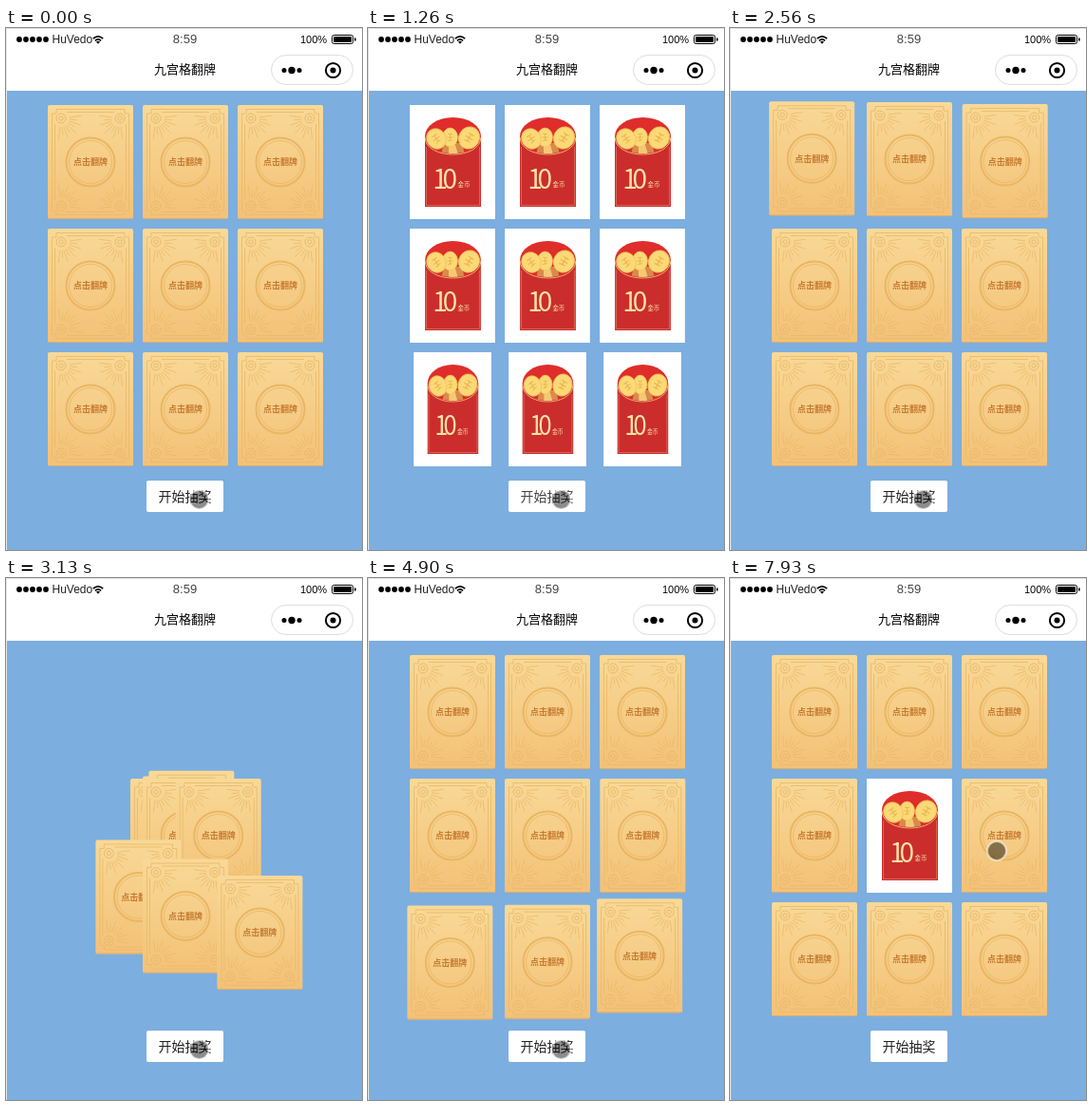
An HTML page for the animation above (8 s loop, 375 by 549 pixels).

```html
<!DOCTYPE html>
<html lang="zh-CN">
<head>
<meta charset="utf-8">
<title>九宫格翻牌</title>
<style>
  html, body { margin: 0; width: 100%; height: 100%; overflow: hidden; background: #fff; }
  svg { display: block; width: 375px; height: 549px; }
  text { font-family: "Noto Sans CJK SC", "Noto Sans CJK", sans-serif; }
  .latin { font-family: "Liberation Sans", sans-serif; }
  .mid { text-anchor: middle; }
</style>
</head>
<body>
<svg viewBox="0 0 375 549" width="375" height="549">
  <defs>
    <linearGradient id="gold" x1="0" y1="0" x2="0" y2="1">
      <stop offset="0" stop-color="#f8d997"/>
      <stop offset="1" stop-color="#f3c177"/>
    </linearGradient>

    <g id="corner" fill="none" stroke="#eaba6a">
      <circle cx="14" cy="14" r="5"/>
      <circle cx="14" cy="14" r="2.2"/>
      <path d="M45 4.5H9V9H4.5V60M45 7.5H20M7.5 60V20" stroke-width=".9"/>
      <g id="rays" stroke-width=".8"></g>
    </g>

    <g id="back">
      <rect width="90" height="120" rx="2" fill="url(#gold)"/>
      <path d="M1 119.5H89" stroke="#dfac66"/>
      <use href="#corner"/>
      <use href="#corner" transform="translate(90 0) scale(-1 1)"/>
      <use href="#corner" transform="translate(0 120) scale(1 -1)"/>
      <use href="#corner" transform="translate(90 120) scale(-1 -1)"/>
      <g fill="none" stroke="#eab663">
        <circle cx="45" cy="60" r="25.5" stroke-width="2"/>
        <circle cx="45" cy="60" r="22.5" stroke-width=".8"/>
      </g>
      <text class="mid" x="45" y="63.4" font-size="9" font-weight="700" fill="#c67a30">点击翻牌</text>
    </g>

    <g id="coin">
      <ellipse rx="10" ry="11" fill="#fbd977" stroke="#f3c257" stroke-width=".8"/>
      <path d="M-3 -4L3 -4M0 -4V4M-4 0H4M-3 4L3 3" stroke="#e8b24a" fill="none"/>
    </g>

    <g id="front">
      <rect width="90" height="120" fill="#fff"/>
      <ellipse cx="45.5" cy="33" rx="29.5" ry="20" fill="#df2d2b"/>
      <path d="M36 40H55L58 52H33Z" fill="#d98a4c"/>
      <path d="M41 42H48L51 52H41Z" fill="#f6c873"/>
      <use href="#coin" transform="translate(42.5 34) scale(.8 .9)"/>
      <use href="#coin" transform="translate(28 35.5) rotate(-35)"/>
      <use href="#coin" transform="translate(62.5 34.5) rotate(32) scale(1.08)"/>
      <path d="M16 33C17 57 74 57 75 33V107H16Z" fill="#cb2d2d"/>
      <path d="M16 34C17 58 74 58 75 34" fill="none" stroke="#f0bd78" stroke-width=".9"/>
      <path d="M17.5 44V105.5H73.5V44" fill="none" stroke="#e58a66" stroke-width=".6"/>
      <text x="24.3 34.6" y="87.5" font-size="28" font-weight="500" fill="#fbe3a6">10</text>
      <text x="50.5" y="86.3" font-size="6.4" fill="#fbe3a6">金币</text>
    </g>
  </defs>

  <rect width="375" height="549" fill="#fff"/>
  <rect x="1" y="66" width="374" height="483" fill="#7caee0"/>
  <path d="M0 .5H375" stroke="#dcdcdc"/>
  <path d="M.5 0V549" stroke="#e6e6e6"/>

  <g id="dots"></g>
  <text class="latin" x="48.5" y="16" font-size="12" fill="#222">HuVedo</text>
  <path d="M91.8 11.2Q97 6.4 102.2 11.2M93.9 13.3Q97 10.5 100.1 13.3" fill="none" stroke="#000" stroke-width="1.7"/>
  <path d="M95 14.6Q97 13 99 14.6L97 16.8Z"/>
  <text class="latin mid" x="188.5" y="16.3" font-size="13" fill="#444">8:59</text>
  <text class="latin" x="310" y="16" font-size="11">100%</text>
  <rect x="343.5" y="7.5" width="22" height="9" rx="2" fill="none" stroke="#000"/>
  <rect x="345" y="9" width="19" height="6" rx=".8"/>
  <rect x="367" y="10.2" width="1.6" height="3.6" rx=".8"/>

  <text class="mid" x="188.5" y="48" font-size="13">九宫格翻牌</text>
  <rect x="279.5" y="28.5" width="86" height="31" rx="15.5" fill="#fff" stroke="#dedede"/>
  <circle cx="293" cy="44.5" r="2.5"/>
  <circle cx="301" cy="44.5" r="3.7"/>
  <circle cx="309" cy="44.5" r="2.5"/>
  <circle cx="344.5" cy="44.5" r="7.6" fill="none" stroke="#000" stroke-width="2"/>
  <circle cx="344.5" cy="44.5" r="3"/>

  <rect x="148" y="476" width="81" height="33" rx="2" fill="#fff"/>
  <text id="label" class="mid" x="188.5" y="498.2" font-size="14">开始抽奖</text>

  <g id="cards"></g>

  <g id="toast">
    <rect x="126.5" y="316" width="125" height="40" rx="4" fill="#111" fill-opacity=".72"/>
    <text class="mid" x="188.8" y="340" font-size="13" fill="#fff">你点击了第5个</text>
  </g>
  <circle id="cursor" r="10" fill="#000" fill-opacity=".45" stroke="#fff" stroke-opacity=".55" stroke-width="2"/>
</svg>

<script>
const LOOP = 8000, FLIP = 600, MOVE = 870;
const $ = id => document.getElementById(id);
const clamp = v => Math.max(0, Math.min(1, v));

function add(parent, tag, attrs) {
  const el = document.createElementNS('http://www.w3.org/2000/svg', tag);
  for (const k in attrs) el.setAttribute(k, attrs[k]);
  return parent.appendChild(el);
}

function bezier(x1, y1, x2, y2) {
  const at = (a, b, s) => 3 * (1 - s) * (1 - s) * s * a + 3 * (1 - s) * s * s * b + s * s * s;
  return x => {
    if (x <= 0 || x >= 1) return clamp(x);
    let lo = 0, hi = 1;
    for (let i = 0; i < 24; i++) {
      const m = (lo + hi) / 2;
      if (at(x1, x2, m) < x) lo = m; else hi = m;
    }
    return at(y1, y2, lo);
  };
}
const ease = bezier(.25, .1, .25, 1);
const swing = bezier(.56, -.25, .36, 1.25);
const glide = bezier(.42, 0, .58, 1);

for (let i = 0; i < 5; i++) add($('dots'), 'circle', { cx: 14 + 7 * i, cy: 12, r: 2.9 });

for (let i = 0; i < 9; i++) {
  const a = (i * 13 - 7) * Math.PI / 180, end = i % 2 ? 17 : 22;
  const p = r => `${(14 + r * Math.cos(a)).toFixed(1)} ${(14 + r * Math.sin(a)).toFixed(1)}`;
  add($('rays'), 'path', { d: `M${p(9)}L${p(end)}` });
}

const cards = Array.from({ length: 9 }, (_, i) => ({
  i,
  row: Math.floor(i / 3),
  x: 44 + 100 * (i % 3),
  y: 81 + 130 * Math.floor(i / 3),
  el: add($('cards'), 'use', { href: '#back' })
}));

// Half turns made by a card: 0 shows the back, 1 the front
function turn(card, t) {
  const run = start => ease((t - start) / FLIP);
  const lag = card.row * 135;
  return run(650 + lag) - run(1420 + lag) + (card.i === 4 ? run(6440) : 0);
}

// 0 in the grid, 1 on the pile in the middle
function gathered(card, t) {
  return swing((t - 2460 - 43.5 * card.i) / MOVE) - swing((t - 3629 - 82 * card.i) / MOVE);
}

const path = [
  [0, 203.5, 496], [5200, 203.5, 496], [5680, 171.5, 284.5], [6950, 171.5, 284.5],
  [7390, 207, 414], [7440, 207, 414], [7850, 281, 287], [LOOP, 281, 287]
];
function cursorAt(t) {
  const k = path.findIndex(p => p[0] > t);
  const [t0, x0, y0] = path[k - 1], [t1, x1, y1] = path[k];
  const p = glide((t - t0) / (t1 - t0));
  return [x0 + (x1 - x0) * p, y0 + (y1 - y0) * p];
}

const within = (t, a, b) => t >= a && t < b;

function render(t) {
  for (const c of cards) {
    const g = gathered(c, t), f = turn(c, t);
    const x = c.x + (144 - c.x) * g, y = c.y + (211 - c.y) * g;
    const w = Math.abs(Math.cos(f * Math.PI));
    c.el.setAttribute('href', f > .5 ? '#front' : '#back');
    c.el.setAttribute('transform',
      `translate(${(x + 45).toFixed(2)} ${y.toFixed(2)}) scale(${w.toFixed(4)} 1) translate(-45 0)`);
  }
  const soft = within(t, 280, 2500) || within(t, 6050, 6480);
  $('label').setAttribute('fill', soft ? '#444' : '#222');
  $('toast').style.display = within(t, 6050, 7500) ? '' : 'none';
  const [x, y] = cursorAt(t);
  $('cursor').setAttribute('transform', `translate(${x.toFixed(2)} ${y.toFixed(2)})`);
}

const begin = performance.now();
function tick() {
  render((performance.now() - begin) % LOOP);
  requestAnimationFrame(tick);
}
tick();
</script>
</body>
</html>
```
